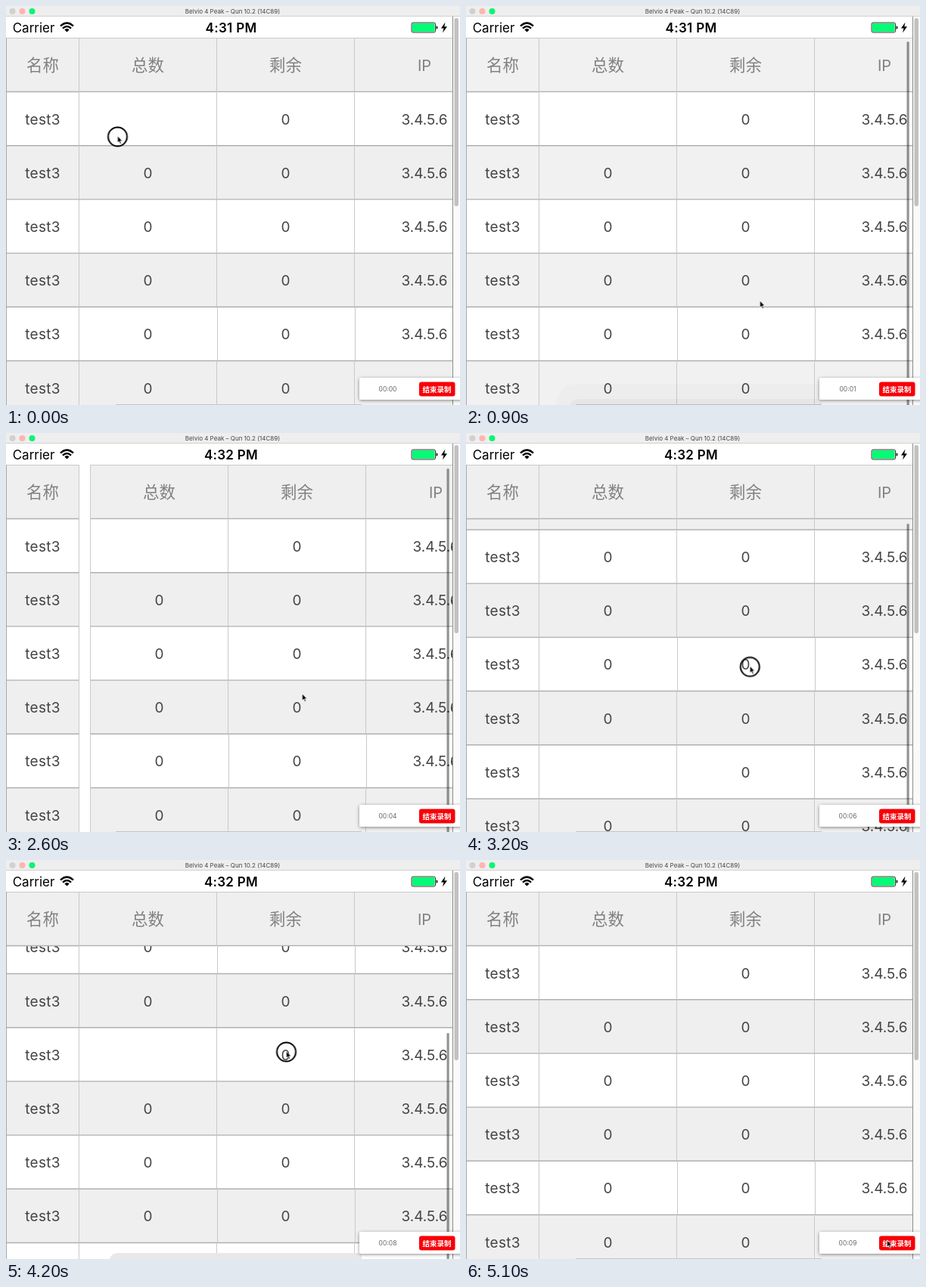
Animation of 600 by 528 pixels, one loop 5.2 s. Source, as an HTML page:

```html
<!DOCTYPE html>
<html lang="zh-CN">
<head>
<meta charset="utf-8">
<title>Table</title>
<style>
@property --x { syntax: "<number>"; inherits: true; initial-value: 0; }
@property --y { syntax: "<number>"; inherits: true; initial-value: 0; }
html, body { margin: 0; width: 100%; height: 100%; overflow: hidden; background: #fff; }
svg { --bg: #efefef; display: block; width: 600px; height: 528px; font-family: Inter, "Noto Sans CJK SC", "Noto Sans CJK", sans-serif; }
text { text-anchor: middle; }
.cell { font-size: 19px; fill: #444; }
.name { letter-spacing: .3px; }
.head { font-size: 21.4px; fill: #808080; }
.latin { font-size: 20px; }
.odd { fill: var(--bg); }
.even { fill: #fff; }
.rule { stroke: #b0b0b0; stroke-width: 1.4; }
.col { stroke: #c9c9c9; }
.scroll-x { transform: translateX(calc(var(--x) * -1px)); }
.scroll-y { transform: translateY(calc(var(--y) * -1px)); }
#bar { transform: translateY(calc(var(--y) * .569px)); }
</style>
</head>
<body>
<svg id="stage" viewBox="0 0 600 528">
  <defs>
    <clipPath id="headClip"><rect x="96" y="42" width="494" height="72.2"/></clipPath>
    <clipPath id="nameClip"><rect x="0" y="114" width="97" height="414"/></clipPath>
    <clipPath id="bodyClip"><rect x="96" y="114" width="494" height="414"/></clipPath>
    <filter id="shadow" x="-10%" y="-30%" width="120%" height="180%">
      <feDropShadow dx="0" dy="1" stdDeviation="2" flood-opacity=".45"/>
    </filter>
  </defs>
  <rect width="600" height="528" fill="#fff"/>

  <g clip-path="url(#bodyClip)"><g class="scroll-x"><g id="cells" class="scroll-y"></g></g></g>
  <g clip-path="url(#nameClip)"><g id="names" class="scroll-y"></g></g>
  <g clip-path="url(#headClip)"><g id="heads" class="scroll-x"></g></g>
  <g id="corner"></g>
  <path d="M.5 42V528" stroke="#a8a8a8"/>
  <rect id="bar" x="582.5" y="47" width="3.2" height="700" rx="1.6" fill="#000" fill-opacity=".42"/>

  <path d="M145 527.5H470" stroke="#c4c4c4"/>
  <g id="dock">
    <path d="M119 528Q122 500 148 500H470V528Z" opacity=".014"/>
    <path d="M137 528Q139 520 149 520H470V528Z" opacity=".03"/>
  </g>
  <path id="dockEdge" d="M137 528Q139 520 149 520H470V528Z" fill="#e8e8e8"/>

  <path d="M590.5 14V528" stroke="#8c8c8c"/>
  <rect x="591" y="14" width="9" height="514" fill="#fafafa"/>
  <rect x="592.5" y="16" width="5.5" height="249" rx="2.7" fill="#c1c1c1"/>

  <rect width="600" height="14" fill="#eee"/>
  <path d="M0 13.5H600" stroke="#d2d2d2"/>
  <circle cx="8.5" cy="7" r="4" fill="#d2d0d1"/>
  <circle id="light" cx="21.5" cy="7" r="4"/>
  <circle cx="34.5" cy="7" r="4" fill="#0cf574"/>
  <text x="299.5" y="10" font-size="8" fill="#444">Belvio 4 Peak – Qun 10.2 (14C89)</text>

  <text x="36.5" y="35" font-size="17">Carrier</text>
  <g fill="none" stroke="#000" stroke-width="2.4">
    <path d="M72 26.5Q80.5 18.5 89 26.5M75 29.7Q80.5 24.5 86 29.7"/>
    <path d="M77.4 31.4Q80.5 28.8 83.6 31.4L80.5 34.5Z" fill="#000" stroke="none"/>
  </g>
  <text id="time" x="297.5" y="35" font-size="17" font-weight="600" letter-spacing=".3"></text>
  <rect x="536" y="22" width="31.5" height="13" rx="2" fill="none" stroke="#333"/>
  <rect x="537" y="23" width="29.5" height="11" rx="1" fill="#04fb75"/>
  <path d="M568.5 26.5h1q1 0 1 2t-1 2h-1z" fill="#222"/>
  <path d="M580.5 21.5L575 29.5H578.5L577 35.5L583 27.2H579.3Z"/>

  <rect x="467" y="492" width="140" height="29" rx="2" fill="#fff" filter="url(#shadow)"/>
  <text id="count" x="504.5" y="510" font-size="8.5" fill="#666"></text>
  <rect x="546" y="497.5" width="47.5" height="19" rx="3" fill="#f80008"/>
  <text x="569.5" y="510.5" font-size="9.5" font-weight="700" fill="#fff">结束录制</text>

  <g id="cursor">
    <circle id="press" cy="1" r="12.5" fill="none" stroke="#000" stroke-width="2"/>
    <path d="M0 0V9L2 7.2L3.5 10.6L5 10L3.5 6.7H6.2Z" stroke="#fff" stroke-width=".7"/>
  </g>
</svg>
<script>
const LOOP = 5200, STEP = 100, ROW = 71.2, TOP = 113.5;
const EDGES = [96.5, 278.5, 460.5, 644.5, 827.5];
const MIDS = [187.5, 369.5, 553, 736];
const $ = id => document.getElementById(id);

const text = (x, y, str, cls) => `<text x="${x}" y="${y}" class="${cls}">${str}</text>`;
const line = (x1, y1, x2, y2, cls) => `<path d="M${x1} ${y1}L${x2} ${y2}" class="${cls}"/>`;
const band = (x, y, w, h, odd) => `<rect x="${x}" y="${y}" width="${w}" height="${h}" class="${odd ? 'odd' : 'even'}"/>`;
const columns = (y, h, edges = EDGES) => edges.map(x => line(x, y, x, y + h, 'col')).join('');

// Header
const heading = (x, str) => text(x, 86, str, /[A-Z]/.test(str) ? 'head latin' : 'head');
const headBand = (x, w) => band(x, 42, w, 72, true) +
  line(x, 42.5, x + w, 42.5, 'col') + line(x, TOP, x + w, TOP, 'rule');
$('heads').innerHTML = headBand(96.5, 731) + columns(42, 72) +
  ['总数', '剩余', 'IP', '状态'].map((s, i) => heading(MIDS[i], s)).join('');
$('corner').innerHTML = headBand(0, 97) + line(96.5, 42, 96.5, 114, 'col') + heading(48.5, '名称');

// Rows: all bands go beneath the rules
let bands = '', cells = '', nameBands = '', names = '';
for (let i = 0; i < 14; i++) {
  const y = +(TOP + ROW * i).toFixed(1), base = y + 43, bottom = y + ROW;
  const values = [i % 6 ? '0' : '', '0', '3.4.5.6', '038259160364'];
  const nudge = i % 5 === 4 ? 1 : 0; // cell edges round up here
  const edges = EDGES.map((x, k) => k === 1 || k === 2 ? x + nudge : x);
  bands += band(96.5, y, 731, ROW, i % 2);
  cells += columns(y, ROW, edges) + line(96.5, bottom, 827.5, bottom, 'rule') +
    values.map((v, k) => text(MIDS[k], base, v, 'cell')).join('');
  nameBands += band(0, y, 97, ROW, i % 2);
  names += line(96.5, y, 96.5, bottom, 'col') + line(0, bottom, 97, bottom, 'rule') +
    text(48.5, base, 'test3', 'cell name');
}
$('cells').innerHTML = bands + cells;
$('names').innerHTML = nameBands + names;

// Motion: [ms, value, easing to the next key]
const tracks = [];
function track(el, prop, keys, format = v => v) {
  const frames = keys.map(([ms, v, easing = 'linear']) =>
    ({ offset: ms / LOOP, [prop]: format(v), easing }));
  const anim = el.animate(frames, { duration: LOOP, fill: 'both' });
  anim.pause();
  tracks.push(anim);
}
const OUT = 'cubic-bezier(.2,.6,.3,1)', SOFT = 'ease-in-out';

track($('stage'), '--x', [[0, 0], [950, 0, SOFT], [1600, 229], [1900, 229, SOFT],
  [2200, 110], [2300, 110, OUT], [2600, -15, SOFT], [2900, 0], [LOOP, 0]]);
track($('stage'), '--y', [[0, 0], [2950, 0, SOFT], [3400, 215, OUT], [3600, 256.3, OUT],
  [4100, 319], [4200, 319, SOFT], [4700, 0], [LOOP, 0]]);
track($('bar'), 'opacity', [[0, 0], [600, 0], [700, 1], [4650, 1], [4900, 0], [LOOP, 0]]);
track($('cursor'), 'transform', [
  [0, [147.5, 172], SOFT], [800, [388.5, 390]], [950, [388.5, 390], SOFT],
  [1500, [285, 342]], [1900, [285, 342], SOFT], [2200, [350, 345]], [2300, [350, 345], OUT],
  [2500, [391.5, 345]], [2700, [391.5, 345], SOFT], [2900, [385, 440], SOFT],
  [3400, [370.5, 243]], [3700, [370.5, 243]], [4100, [370.5, 253]], [4200, [370.5, 253], SOFT],
  [4600, [378, 440], SOFT], [5000, [556.5, 503]], [LOOP, [556.5, 503]]
], ([x, y]) => `translate(${x}px, ${y}px)`);

const within = (t, ...spans) => spans.some(([a, b]) => t >= a && t < b);
const show = (el, on) => el.style.visibility = on ? 'visible' : 'hidden';

function draw(t) {
  tracks.forEach(a => a.currentTime = t);
  const pale = within(t, [700, 2400]);
  $('stage').style.setProperty('--bg', pale ? '#f1f1f1' : '#efefef');
  $('light').setAttribute('fill', within(t, [1300, 2400]) ? '#d2d0d1' : '#ffb4b1');
  $('time').textContent = t < 2400 ? '4:31 PM' : '4:32 PM';
  $('count').textContent = '00:0' + Math.floor(t * 1.91 / 1000);
  show($('dock'), pale);
  show($('dockEdge'), within(t, [4000, 4500]));
  show($('press'), within(t, [0, 200], [1000, 1500], [1900, 2500], [3000, 3400], [4200, 4600]));
}

const start = performance.now();
function tick() {
  const t = (performance.now() - start) % LOOP;
  draw(Math.floor(t / STEP) * STEP);
  requestAnimationFrame(tick);
}
tick();
</script>
</body>
</html>
```
